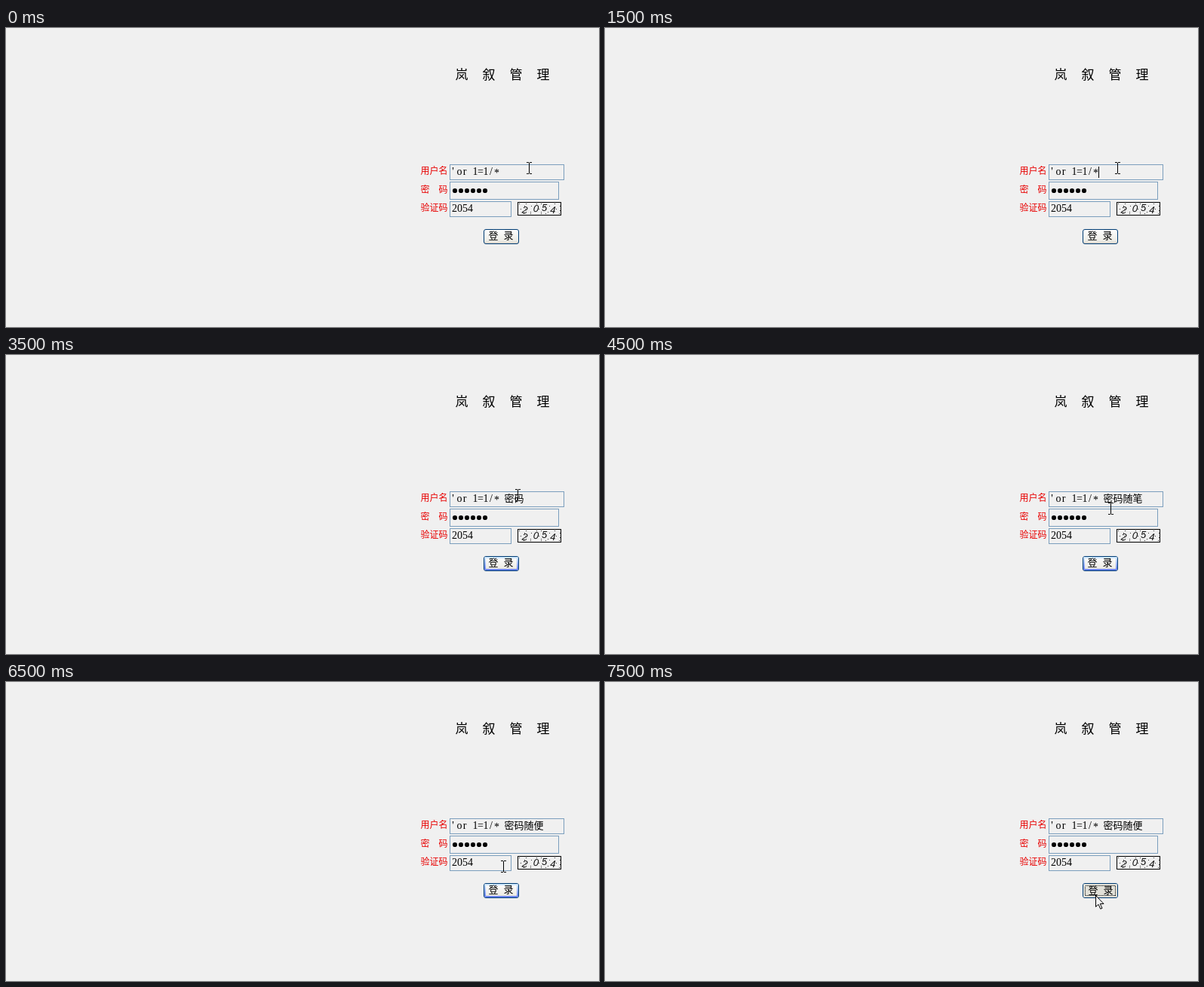
Animation of 786 by 397 pixels, one loop 8 s. Source, as an HTML page:

```html
<!DOCTYPE html>
<html lang="zh-CN">
<head>
<meta charset="utf-8">
<title>登录</title>
<style>
html, body { margin: 0; width: 100%; height: 100%; overflow: hidden; background: #f0f0f0; }
svg { display: block; }
text { font: 13px "Liberation Serif", "Noto Sans CJK SC", "Noto Sans CJK", serif; white-space: pre; }
.title { font-size: 17px; }
.label { font-size: 12px; fill: #e80000; }
.latin { font-size: 14px; }
.grid { text-anchor: middle; }
.field { fill: #f0f0f0; stroke: #7b9ebd; }
.captcha { font: italic 13px "Liberation Sans", sans-serif; text-anchor: middle; }
.ring { fill: none; stroke-width: 2; }

/* One step is 500 ms = 6.25% */
.play { animation: 8s step-end infinite; }
#caret { animation-name: caret; }
#beam { animation-name: beam; }
#arrow { animation-name: arrow; }
#focus { animation-name: focus; }
#hover { animation-name: hover; }
#press { animation-name: press; }
#caption { animation-name: caption; }
#first { animation-name: first; }
#wrong { animation-name: wrong; }
#right { animation-name: right; }

@keyframes caret {
  0%, 12.5%, 43.75%, 56.25%, 68.75%, 81.25%, 93.75%, 100% { opacity: 0; transform: none; }
  6.25%, 18.75%, 25% { opacity: 1; transform: translateX(654px); }
  31.25% { opacity: 1; transform: translateX(661px); }
  37.5%, 62.5% { opacity: 1; transform: translateX(687px); }
  50%, 75%, 87.5% { opacity: 1; transform: translateX(713px); }
}
@keyframes beam {
  0% { transform: translate(690px, 178px); opacity: 1; }
  6.25% { transform: translate(676px, 178px); opacity: 1; }
  25% { transform: translate(675px, 178px); opacity: 1; }
  50% { transform: translate(669px, 181px); opacity: 1; }
  56.25% { transform: translate(667px, 196px); opacity: 1; }
  81.25% { transform: translate(656px, 237px); opacity: 1; }
  87.5%, 100% { transform: translate(656px, 237px); opacity: 0; }
}
@keyframes arrow {
  0% { transform: translate(654px, 269px); opacity: 0; }
  87.5% { transform: translate(654px, 269px); opacity: 1; }
  93.75%, 100% { transform: translate(650px, 283px); opacity: 1; }
}
@keyframes focus { 0%, 12.5%, 87.5%, 100% { opacity: 0; } 6.25%, 25% { opacity: 1; } }
@keyframes hover { 0%, 93.75%, 100% { opacity: 0; } 87.5% { opacity: 1; } }
@keyframes press { 0% { opacity: 0; } 93.75%, 100% { opacity: 1; } }
@keyframes caption { 0% { transform: none; } 93.75%, 100% { transform: translate(1px, 1px); } }
@keyframes first { 0% { opacity: 0; } 37.5%, 100% { opacity: 1; } }
@keyframes wrong { 0%, 62.5%, 100% { opacity: 0; } 50% { opacity: 1; } }
@keyframes right { 0% { opacity: 0; } 75%, 100% { opacity: 1; } }
</style>
</head>
<body>
<svg width="786" height="397" viewBox="0 0 786 397">
  <defs>
    <linearGradient id="face" x2="0" y2="1">
      <stop stop-color="#fff"/><stop offset=".8" stop-color="#edece6"/><stop offset="1" stop-color="#d6d0c5"/>
    </linearGradient>
    <linearGradient id="blue" x2="0" y2="1">
      <stop stop-color="#cee7ff"/><stop offset="1" stop-color="#6982ee"/>
    </linearGradient>
    <linearGradient id="amber" x2="0" y2="1">
      <stop stop-color="#fff0cf"/><stop offset="1" stop-color="#e5970d"/>
    </linearGradient>
  </defs>

  <text class="title" x="595.5 631.5 667.5 703.5" y="68">岚叙管理</text>

  <text class="label" x="549.5" y="194">用户名</text>
  <text class="label" x="549.5 573.5" y="219">密码</text>
  <text class="label" x="549.5" y="243">验证码</text>

  <rect class="field" x="588.5" y="181.5" width="151" height="20"/>
  <rect class="field" x="588.5" y="204.5" width="144" height="23"/>
  <rect class="field" x="588.5" y="230.5" width="81" height="20"/>

  <text class="latin grid" x="592.5 601 608 615 622 629 636 643 650.5" y="195 195 195 195 195 195 195 195 197">'or 1=1/*</text>
  <text id="first" class="play" x="660.5" y="195">密码</text>
  <text id="wrong" class="play" x="686.5" y="195">随笔</text>
  <text id="right" class="play" x="686.5" y="195">随便</text>
  <rect id="caret" class="play" y="184" width="1" height="15"/>

  <path d="M595 216h40.1" stroke="#000" stroke-width="6.2" stroke-linecap="round" stroke-dasharray="0 8"/>
  <text class="latin" x="591" y="244">2054</text>

  <rect x="678.5" y="231.5" width="57" height="17" fill="#f0f0f0" stroke="#000"/>
  <path d="M680 233.5h54v3h-54v4h54v4h-54v2h54" fill="none" stroke="#333" stroke-dasharray="1 8 1 13 1 5 1 17" shape-rendering="crispEdges"/>
  <g fill="#111">
    <text class="captcha" transform="translate(687 246) rotate(8)">2</text>
    <text class="captcha" transform="translate(702 244) rotate(5)">0</text>
    <text class="captcha" transform="translate(713.5 243)">5</text>
    <text class="captcha" transform="translate(724.5 246) rotate(4)">4</text>
  </g>

  <rect x="633.5" y="267.5" width="46" height="19" rx="2.5" fill="url(#face)" stroke="#003c74"/>
  <rect id="focus" class="ring play" x="635" y="269" width="43" height="16" rx="1" stroke="url(#blue)"/>
  <rect id="hover" class="ring play" x="635" y="269" width="43" height="16" rx="1" stroke="url(#amber)"/>
  <g id="press" class="play">
    <rect x="634" y="268" width="45" height="18" rx="2" fill="#e1e0d8"/>
    <rect x="636.5" y="270.5" width="40" height="13" fill="none" stroke="#000" stroke-dasharray="1 1" shape-rendering="crispEdges"/>
  </g>
  <text id="caption" class="play" x="639.5 659.5" y="280">登录</text>

  <path id="beam" class="play" d="M0 0h3v1h1v-1h3v1h-3v14h3v1h-3v-1h-1v1h-3v-1h3v-14h-3z" shape-rendering="crispEdges"/>
  <path id="arrow" class="play" d="M.5 .5V15.5L4 12.3 6.8 18.3 9 17.3 6.3 11.5H11Z" fill="#f4f4f4" stroke="#000"/>
</svg>
</body>
</html>
```
